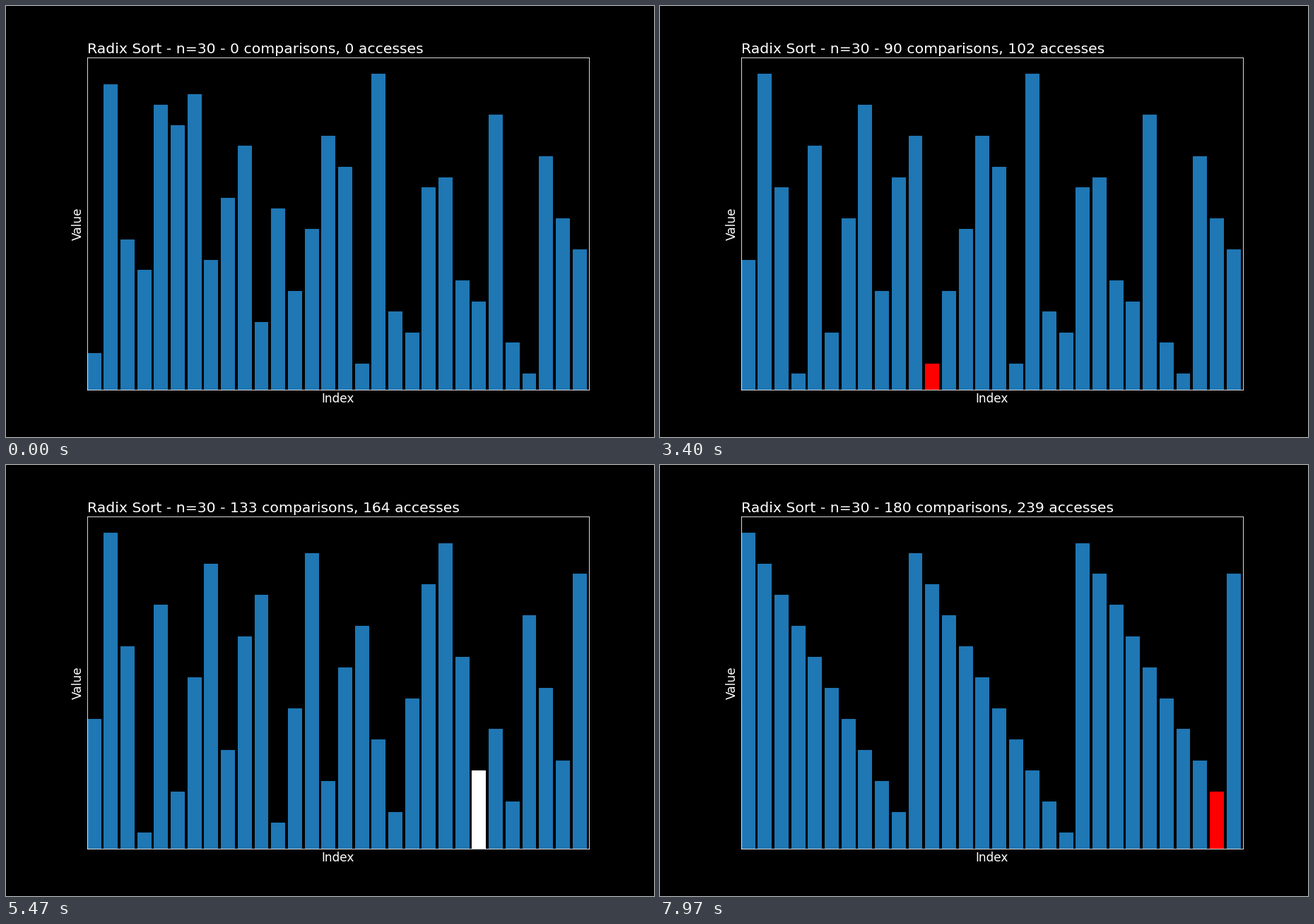
Recreate the animation shown at these times as a matplotlib script. Size 917 px wide and 611 px high, loop 8 s.

```python
import numpy as np
import matplotlib.pyplot as plt
from matplotlib.animation import FuncAnimation

WIDTH, HEIGHT, DPI = 917, 611, 611 / 8
FRAMES, LOOP_MS = 240, 8000
N = 30
BLUE = "#1f77b4"
COLORS = {"get": "white", "set": "red"}

ORDER = [2, 28, 13, 10, 26, 24, 27, 11, 17, 22, 5, 16, 8, 14, 23,
         20, 1, 29, 6, 4, 18, 19, 9, 7, 25, 3, 0, 21, 15, 12]
LEVELS = np.round(np.linspace(50, 1000, N)).astype(int)


def radix_steps(values):
    """Yield (operation, index, snapshot) for each access of an LSD radix sort."""
    data = list(values)
    yield None, None, data[:]
    exp = 1
    while max(data) // exp > 0:
        # count the digits
        for i in range(N):
            yield "get", i, data[:]
        # place from the back: one read for the digit, one for the value
        for i in reversed(range(N)):
            yield "get", i, data[:]
            yield "get", i, data[:]
        # copy the result back
        output = sorted(data, key=lambda v: v // exp % 10)
        for i in range(N):
            data[i] = output[i]
            yield "set", i, data[:]
        exp *= 10


steps = list(radix_steps(LEVELS[ORDER]))[:FRAMES]
reads = np.cumsum([0] + [op == "get" for op, _, _ in steps])

plt.style.use("dark_background")
plt.rcParams.update({"font.family": "DejaVu Sans", "font.size": 16})

fig, ax = plt.subplots(figsize=(WIDTH / DPI + 1e-6, HEIGHT / DPI + 1e-6), dpi=DPI)
bars = ax.bar(np.arange(N), steps[0][2], width=0.8, align="edge", color=BLUE)
ax.set(xlim=(0, N), ylim=(0, 1050), xticks=[], yticks=[],
       xlabel="Index", ylabel="Value")
title = ax.set_title("", loc="left")


def update(frame):
    op, index, data = steps[frame]
    title.set_text(f"Radix Sort - n={N} - {reads[frame]} comparisons, "
                   f"{frame} accesses")
    for i, (bar, value) in enumerate(zip(bars, data)):
        bar.set_height(value)
        bar.set_color(COLORS[op] if i == index else BLUE)
    return [title, *bars]


anim = FuncAnimation(fig, update, frames=FRAMES, interval=LOOP_MS / FRAMES,
                     repeat=True, repeat_delay=0, blit=False)
plt.show()
```
